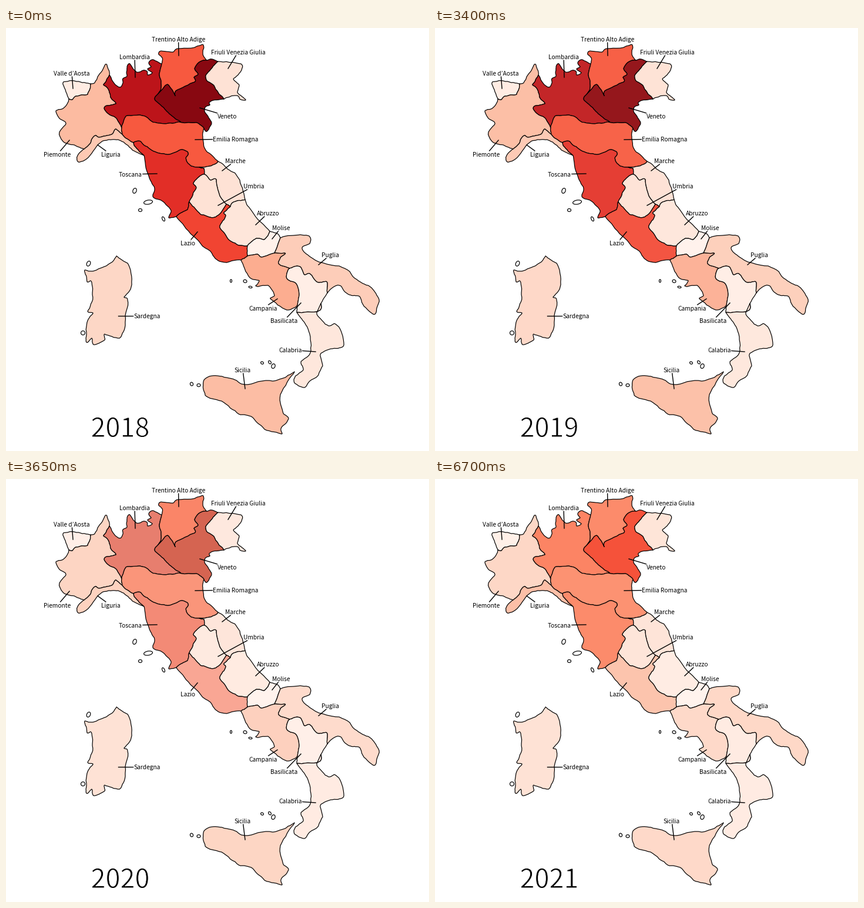
Animation, 720 px wide and 720 px high, one loop 8000 ms. Source, as a matplotlib script:

```python
import numpy as np
import matplotlib.pyplot as plt
from matplotlib.animation import FuncAnimation
from matplotlib.patches import Ellipse, Polygon
from matplotlib.patheffects import Stroke

SIZE, DPI = 720, 72
INTERVAL, LOOP = 50, 8000
FADE_STARTS, FADE_STEPS = (500, 3400, 6300), 9
FONT = "Noto Sans CJK JP"
ROUGHNESS = 0.04

# Key points (x, y, x, y, ...) of coasts and borders; neighbours share them.
ARCS = {
    "vda_n": [107,121, 97,96, 103,91, 120,91, 144,95],
    "vda_s": [144,95, 139,113, 119,116, 113,122, 107,121],
    "pie_n": [144,95, 150,94, 156,83, 169,62, 173,67, 176,80],
    "pie_lom": [176,80, 166,96, 174,104, 180,121, 187,129, 172,132, 168,139, 186,152, 197,170],
    "pie_emi": [197,170, 198,181],
    "pie_lig": [198,181, 187,172, 180,181, 158,186, 152,183, 143,197, 133,206],
    "pie_w": [133,206, 116,199, 97,193, 91,177, 102,163, 91,154, 85,141, 97,137, 107,121],
    "lig_s": [133,206, 123,215, 123,228, 137,223, 161,195, 180,190, 200,194, 213,205, 235,217],
    "lig_tos": [235,217, 219,201, 217,195],
    "lig_emi": [217,195, 207,189, 198,181],
    "lom_n": [176,80, 191,100, 198,96, 199,86, 206,81, 206,66, 211,61, 222,75, 239,73, 241,80,
              249,76, 241,70, 247,66, 243,59, 251,54, 265,61],
    "lom_tre": [265,61, 261,79, 264,92, 259,112],
    "lom_ven": [259,112, 253,121, 268,135, 278,146, 299,161],
    "lom_emi": [299,161, 272,163, 248,159, 231,149, 210,149, 203,152, 197,170],
    "tre_n": [265,61, 266,51, 260,45, 264,39, 283,41, 293,35, 334,28, 335,42, 342,55],
    "tre_ven": [342,55, 333,56, 321,69, 327,78, 320,84, 321,92, 289,107, 288,115, 275,96, 259,112],
    "ven_n": [342,55, 351,53, 361,57],
    "ven_fri": [361,57, 348,71, 340,84, 352,96, 362,111, 371,121],
    "ven_e": [371,121, 347,126, 347,131, 340,134, 339,144, 350,162, 342,176, 337,171],
    "ven_emi": [337,171, 324,161, 299,161],
    "fri_e": [361,57, 400,61, 397,77, 387,87, 397,97, 394,110, 408,122, 398,121, 392,115, 371,121],
    "emi_e": [337,171, 335,185, 340,208, 361,227],
    "emi_mar": [361,227, 355,232, 329,237],
    "emi_tos": [329,237, 312,232, 306,221, 310,214, 298,207, 272,215, 245,206, 229,193, 217,195],
    "tos_mar": [329,237, 337,239, 338,249],
    "tos_umb": [338,249, 330,252, 319,264, 324,272, 312,296],
    "tos_laz": [312,296, 309,309, 301,313, 290,321],
    "tos_w": [235,217, 243,252, 253,275, 250,287, 268,296, 281,311, 277,323, 290,321],
    "mar_umb": [338,249, 348,259, 358,258, 364,286, 375,300],
    "umb_laz": [375,300, 359,320, 341,320, 325,311, 312,296],
    "laz_mar": [375,300, 382,304],
    "mar_abr": [382,304, 386,297, 407,292],
    "mar_e": [361,227, 377,240, 398,259, 407,292],
    "laz_abr": [382,304, 371,314, 374,320, 364,337, 371,348, 390,366, 411,371],
    "laz_mol": [411,371, 411,388],
    "laz_cam": [411,388, 400,395],
    "laz_w": [290,321, 314,350, 348,380, 367,398, 400,395],
    "abr_e": [407,292, 418,311, 449,346],
    "abr_mol": [449,346, 440,360, 426,358, 411,371],
    "mol_e": [449,346, 462,350, 467,357],
    "mol_pug": [467,357, 457,383],
    "mol_cam": [457,383, 435,390, 428,385, 411,388],
    "cam_pug": [457,383, 475,383, 469,389, 464,401, 483,409],
    "cam_bas": [483,409, 478,426, 493,434, 499,452, 496,472],
    "cam_w": [400,395, 415,425, 431,430, 425,439, 446,438, 457,455, 450,461, 478,480, 496,472],
    "bas_pug": [483,409, 500,406, 508,420, 517,418, 531,433, 546,432, 547,451],
    "bas_e": [547,451, 536,469],
    "bas_cal": [536,469, 533,481, 495,484],
    "bas_w": [495,484, 496,472],
    "pug_e": [467,357, 490,353, 516,354, 517,367, 504,374, 517,389, 567,405, 597,428, 622,442,
              635,462, 629,486, 617,481, 602,457, 584,454, 571,440, 559,440, 547,451],
    "cal": [536,469, 529,487, 549,507, 559,503, 569,513, 575,536, 570,544, 547,548, 535,556,
            539,575, 517,601, 507,612, 491,604, 493,592, 506,582, 502,568, 519,549, 514,512,
            500,491, 495,484],
    "sic": [491,585, 467,624, 472,656, 481,665, 468,682, 469,691, 440,683, 417,661, 396,657,
            367,635, 339,625, 337,599, 360,592, 390,599, 407,607, 454,601, 480,591, 491,585],
    "sar": [188,388, 209,404, 213,441, 201,458, 207,463, 203,506, 193,528, 168,521, 168,531,
            149,539, 146,528, 139,535, 136,528, 139,498, 148,485, 139,482, 147,454, 145,431,
            138,432, 134,412, 151,413, 176,401, 188,388],
}

# name: arcs ("-" runs backwards), "Reds" shade in % for 2019 / 2020 / 2021,
#       label centre and the point its leader line ends on
REGIONS = {
    "Valle d’Aosta": ("vda_n vda_s", (5.5, 3.5, 3.5), (112, 77), (114, 103)),
    "Piemonte": ("pie_n pie_lom pie_emi pie_lig pie_w -vda_s", (25, 11.5, 16),
                 (87.5, 215), (108, 191)),
    "Liguria": ("-pie_lig -lig_emi -lig_tos -lig_s", (20.5, 16, 23.5), (178, 215), (156, 199)),
    "Lombardia": ("lom_n lom_tre lom_ven lom_emi -pie_lom", (80, 27.5, 42), (219, 49), (220, 84)),
    "Trentino Alto Adige": ("tre_n tre_ven -lom_tre", (54.5, 35, 39.5), (293.5, 19), (294, 47)),
    "Veneto": ("ven_n ven_fri ven_e ven_emi -lom_ven -tre_ven", (93, 37.5, 56.5),
               (377, 150), (330, 136)),
    "Friuli Venezia Giulia": ("fri_e -ven_fri", (11.5, 5.5, 10), (395, 41), (378, 69)),
    "Emilia Romagna": ("emi_e emi_mar emi_tos lig_emi -pie_emi -lom_emi -ven_emi",
                       (54.5, 27.5, 37.5), (391, 189), (322, 190)),
    "Toscana": ("-emi_tos tos_mar tos_umb tos_laz -tos_w lig_tos", (67, 26, 39.5),
                (212, 249), (257, 248)),
    "Marche": ("mar_e -mar_abr -laz_mar -mar_umb -tos_mar -emi_mar", (11.5, 8.5, 10.5),
               (390, 226), (368, 243)),
    "Umbria": ("mar_umb umb_laz -tos_umb", (11.5, 4.5, 9.5), (421.5, 269), (361, 302)),
    "Lazio": ("laz_mar laz_abr laz_mol laz_cam -laz_w -tos_laz -umb_laz", (60, 16, 22),
              (310, 366), (326, 347)),
    "Abruzzo": ("abr_e abr_mol -laz_abr mar_abr", (9, 5, 5.5), (446, 315), (425, 335)),
    "Molise": ("mol_e mol_pug mol_cam -laz_mol -abr_mol", (2, 1, 1.5), (468, 340), (453, 359)),
    "Campania": ("-mol_cam cam_pug cam_bas -cam_w -laz_cam", (29.5, 11.5, 15),
                 (437.5, 477), (462, 461)),
    "Puglia": ("pug_e -bas_pug -cam_pug -mol_pug", (19, 11.5, 15.5), (552, 386), (532, 403)),
    "Basilicata": ("bas_pug bas_e bas_cal bas_w -cam_bas", (4.5, 3.5, 6), (473, 498), (502, 468)),
    "Calabria": ("cal -bas_cal", (8.5, 5, 6), (484, 548), (527, 551)),
    "Sicilia": ("sic", (24.5, 11.5, 15), (403, 582), (407, 614)),
    "Sardegna": ("sar", (16, 8, 11.5), (240, 490), (191, 490)),
}

# centre x, y, width, height, tilt
ISLETS = [
    (219, 277, 6, 9, 20), (228.5, 310, 6, 5, 0), (268, 325, 4, 8, -25), (242, 296.5, 15, 7, -10),
    (383, 430.5, 3, 5, 0), (407, 431, 6, 5, 20), (416, 441, 6, 3, 10),
    (316, 606, 5, 6, -20), (328, 608, 6, 5, 0), (436, 570, 5, 4, 30),
    (449, 569, 4, 6, -35), (455, 575.5, 6, 8, 20), (131, 519, 7, 7, 0), (140.5, 401, 6, 9, 25),
]

rng = np.random.default_rng(20)


def coastline(flat, rounds=3):
    """Four-point subdivision of the key points, each new point nudged sideways."""
    pts = np.array(flat, float).reshape(-1, 2)
    for _ in range(rounds):
        p = np.vstack([pts[0], pts, pts[-1]])
        mids = (9 * (p[1:-2] + p[2:-1]) - p[:-3] - p[3:]) / 16
        normals = np.diff(pts, axis=0)[:, ::-1] * (1, -1)
        mids += ROUGHNESS * rng.normal(size=(len(mids), 1)) * normals
        pts = np.vstack([np.stack([pts[:-1], mids], axis=1).reshape(-1, 2), pts[-1]])
    return pts


CURVES = {name: coastline(flat) for name, flat in ARCS.items()}


def outline(arc_names):
    return np.vstack([CURVES[name[1:]][::-1] if name[0] == "-" else CURVES[name]
                      for name in arc_names.split()])


def shade(percent):
    return np.array(plt.cm.Reds(percent / 100)[:3])


def add_label(name, centre, tip):
    """Write a name and run a leader line from the edge of its box to the tip."""
    cx, cy = centre
    text = ax.text(cx, cy + 4, name, family=FONT, size=10.2,
                   ha="center", va="baseline", zorder=4)
    half_box = np.array([text.get_window_extent().width / 2 + 1, 6])
    reach = np.subtract(tip, centre)
    start = centre + reach * min(half_box / np.maximum(np.abs(reach), 0.01))
    ax.plot(*zip(start, tip), color="black", lw=1.4, zorder=3)


fig = plt.figure(figsize=(SIZE / DPI, SIZE / DPI), dpi=DPI, facecolor="white")
ax = fig.add_axes([0, 0, 1, 1])
ax.set(xlim=(0, SIZE), ylim=(SIZE, 0))
ax.axis("off")

INK = dict(edgecolor="black", linewidth=1.2, joinstyle="round")
patches, palettes = [], []
for name, (arcs, shades, centre, tip) in REGIONS.items():
    patches.append(ax.add_patch(Polygon(outline(arcs), **INK)))
    palettes.append([shade(s) for s in (shades[0], *shades)])
    add_label(name, centre, tip)

for x, y, w, h, tilt in ISLETS:
    ax.add_patch(Ellipse((x, y), w, h, angle=tilt, facecolor="white", **INK))

# The white rim slims the digits to a light weight.
year_text = ax.text(194.5, 696, "", family=FONT, size=45, ha="center", va="baseline",
                    path_effects=[Stroke(linewidth=1, foreground="white")])


def update(frame):
    t = frame * INTERVAL
    position = sum(np.clip((t - start) // INTERVAL + 1, 0, FADE_STEPS) / FADE_STEPS
                   for start in FADE_STARTS)
    step = min(int(position), len(FADE_STARTS) - 1)
    mix = position - step
    for patch, palette in zip(patches, palettes):
        patch.set_facecolor((1 - mix) * palette[step] + mix * palette[step + 1])
    year_text.set_text(str(2018 + int(position + 0.5)))
    return [*patches, year_text]


anim = FuncAnimation(fig, update, frames=LOOP // INTERVAL, interval=INTERVAL,
                     repeat=True, repeat_delay=0, blit=False)
plt.show()
```
